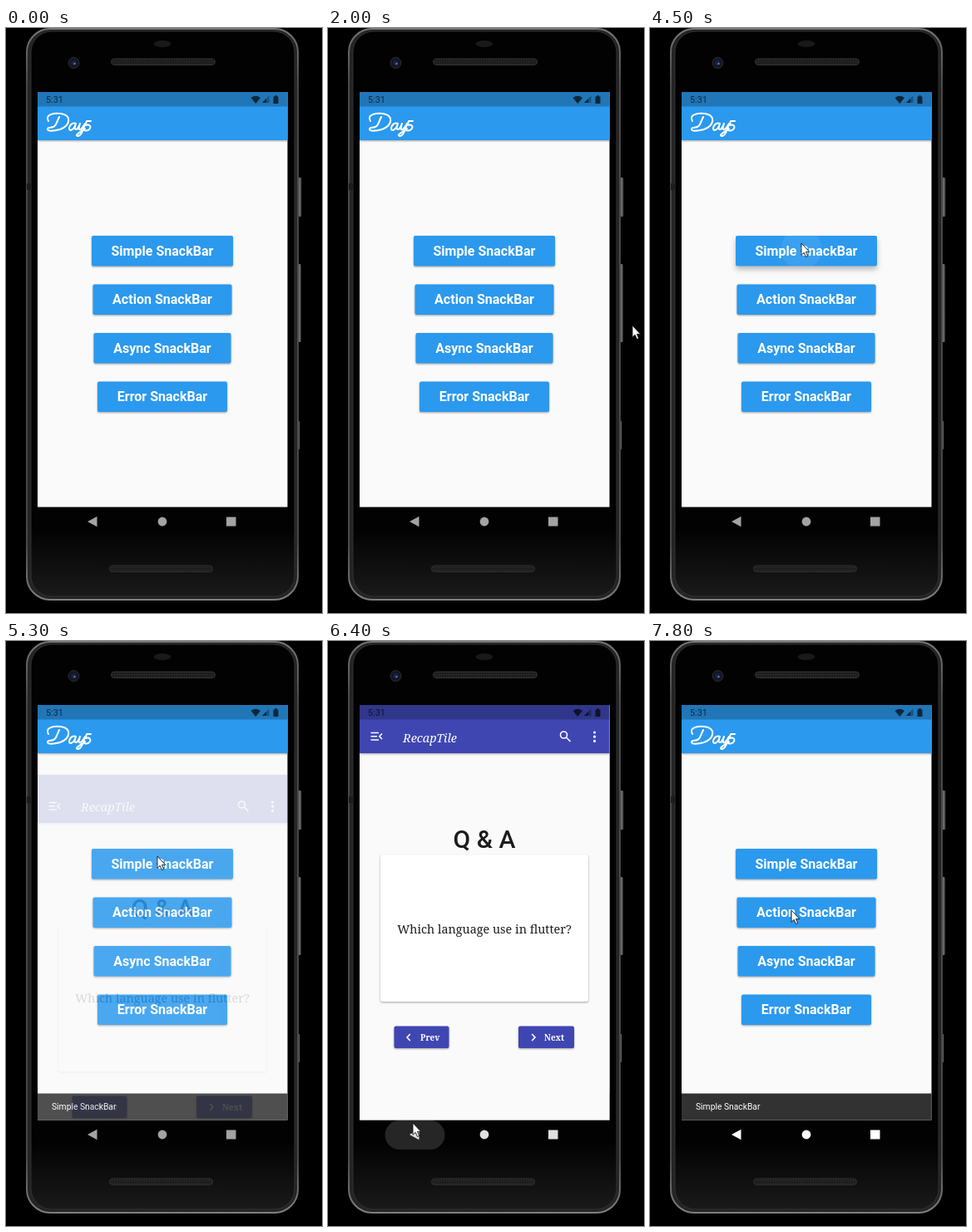
Write an HTML page that moves like this. It is 380 px wide and 704 px high and loops after 8 s.

```html
<!DOCTYPE html>
<html lang="en">
<head>
<meta charset="utf-8">
<title>SnackBar demo</title>
<style>
  html, body { margin: 0; width: 100%; height: 100%; overflow: hidden; background: #000; }
  svg { display: block; width: 380px; height: 704px; }
  text { font-family: Roboto, sans-serif; }
  .slab { font-family: "Noto Serif", serif; }
  .raised { filter: drop-shadow(0 1.5px 1.3px rgba(0,0,0,.36)); }
  .label { font-size: 16.05px; font-weight: 700; fill: #fff; text-anchor: middle; }
  .icon { fill: none; stroke: #fff; stroke-width: 1.6; }
</style>
</head>
<body>
<svg viewBox="0 0 380 704">
  <defs>
    <clipPath id="screen"><rect x="38" y="77" width="300.5" height="499.5"/></clipPath>
    <clipPath id="firstButton"><rect x="103" y="250" width="170" height="36.5" rx="2"/></clipPath>
    <linearGradient id="rim" x2="0" y2="1">
      <stop offset="0" stop-color="#777"/><stop offset=".1" stop-color="#484848"/>
      <stop offset=".9" stop-color="#484848"/><stop offset="1" stop-color="#808080"/>
    </linearGradient>
    <linearGradient id="face" x2="0" y2="1">
      <stop offset=".88" stop-color="#020202"/><stop offset="1" stop-color="#1a1a1a"/>
    </linearGradient>
    <linearGradient id="key">
      <stop offset="0" stop-color="#222"/><stop offset=".55" stop-color="#777"/><stop offset="1" stop-color="#2a2a2a"/>
    </linearGradient>
    <pattern id="mesh" width="3" height="3" patternUnits="userSpaceOnUse">
      <rect width="3" height="3" fill="#1c1c1c"/><circle cx="1.5" cy="1.5" r=".8" fill="#303030"/>
    </pattern>
  </defs>

  <!-- phone body -->
  <g fill="url(#key)">
    <rect x="350" y="180" width="5.5" height="47" rx="1.5"/>
    <rect x="350" y="284" width="5" height="94" rx="1.5"/>
    <rect x="350" y="473" width="3.5" height="34" rx="1"/>
  </g>
  <rect x="25" y="1" width="326" height="687" rx="28" fill="#242424" stroke="url(#rim)" stroke-width="2"/>
  <rect x="30" y="4" width="317" height="680" rx="25" fill="url(#face)" stroke="#303030"/>
  <rect x="25" y="187" width="6" height="8" fill="#1c1c1c"/>
  <ellipse cx="188" cy="19" rx="10.5" ry="4" fill="#191919"/>
  <circle cx="81.5" cy="42" r="6.5" fill="#15171c" stroke="#2c2d33"/>
  <circle cx="81.5" cy="42" r="3" fill="#1a2250"/>
  <circle cx="82.5" cy="43" r="1.1" fill="#7d8ce0"/>
  <g fill="url(#mesh)" stroke="#303030">
    <rect x="126.5" y="37" width="125" height="7.5" rx="3.7"/>
    <rect x="124.5" y="647" width="124" height="7.5" rx="3.7"/>
  </g>

  <g clip-path="url(#screen)">
    <!-- first page -->
    <rect x="38" y="77" width="301" height="500" fill="#fafafa"/>
    <rect class="raised" x="38" y="77" width="301" height="58" fill="#2b99ee"/>
    <g fill="none" stroke="#fff" stroke-width="2" stroke-linecap="round" stroke-linejoin="round" role="img" aria-label="Day5">
      <path d="M51 112C46 104 58 102 66 103C79 105 78 117 65 122C58 124 49 125 50 121C52 118 57 122 60 116L64 107"/>
      <path d="M84 115C78 112 73 123 78 123Q82 122 84 115Q81 123 85 122Q88 119 89 115Q86 124 90 122Q93 119 95 115Q91 131 86 130C82 129 90 125 95 121"/>
      <path d="M102 112H97L95.500 117C105 114 102 126 94 123"/>
    </g>
    <g id="buttons"></g>
    <g clip-path="url(#firstButton)"><circle id="ripple" cx="182" cy="266" fill="#fff"/></g>
    <g id="labels"></g>
    <g id="snack">
      <rect x="38" y="544.5" width="301" height="33" fill="#323232"/>
      <text id="snackText" x="55" y="564" font-size="10.3" fill="#fff">Simple SnackBar</text>
    </g>

    <!-- second page -->
    <g id="page">
      <rect x="38" y="77" width="301" height="500" fill="#fafafa"/>
      <rect class="raised" x="38" y="77" width="301" height="58" fill="#3f46b2"/>
      <path class="icon" d="M51.500 110.500h9.500m-9.500 4.300h7.500m-7.500 4.200h9.500m4-7.500l-3.200 3.300l3.200 3.200"/>
      <text class="slab" x="90" y="121.5" font-size="14.5" font-style="italic" fill="#fff">RecapTile</text>
      <circle class="icon" cx="283.5" cy="113" r="4"/>
      <path class="icon" d="M286.500 116l5 5"/>
      <path d="M320.500 110v11" stroke="#fff" stroke-width="3.2" stroke-linecap="round" stroke-dasharray="0 5.2"/>
      <g fill="#1c1c1c">
        <text x="188" y="248.5" font-size="30" font-weight="500" text-anchor="middle">Q &amp; A</text>
        <rect class="raised" x="63" y="257" width="250" height="177" rx="2.5" fill="#fff"/>
        <text class="slab" x="188" y="351.5" font-size="14.4" text-anchor="middle">Which language use in flutter?</text>
      </g>
      <g class="raised" fill="#3f46b2">
        <rect x="79.5" y="463.5" width="66" height="26.5" rx="2"/>
        <rect x="229" y="463.5" width="67" height="26.5" rx="2"/>
      </g>
      <path class="icon" d="M98.800 473l-3.800 4l3.800 4M245.200 473l3.800 4l-3.800 4"/>
      <g font-size="10" font-weight="600" fill="#fff">
        <text class="slab" x="111" y="481">Prev</text><text class="slab" x="260" y="481">Next</text>
      </g>
    </g>

    <!-- status bar -->
    <rect x="38" y="77" width="301" height="17.5" opacity=".23"/>
    <g opacity=".66">
      <text x="48" y="90" font-size="10.8">5:31</text>
      <path d="M294.500 84q5.800-4.500 11.500 0l-5.700 7z"/>
      <path d="M316.500 81.500v8.500h-8.500z" opacity=".45"/><path d="M313 85v5h-5z"/>
      <path d="M321.500 82.500h1.500v-1.200h3v1.200h1.500v8.500h-6z"/>
    </g>
  </g>

  <!-- navigation bar -->
  <rect id="pill" x="68.5" y="577" width="72" height="35" rx="17.5" fill="#262626"/>
  <g id="nav">
    <path d="M98 594l11.500-6.200v12.400z"/>
    <circle cx="188" cy="594" r="5.4"/>
    <rect x="265" y="588.5" width="11.5" height="11"/>
  </g>

  <path id="cursor" d="M0 0v14.300l3.200-3l2.300 5.200l2.200-1l-2.200-5.100h4.300z" fill="#fff" stroke="#111" stroke-width=".9"/>
</svg>
<script>
const LOOP = 8000, STEP = 100;
const $ = id => document.getElementById(id);
const ramp = (t, from, to) => Math.min(1, Math.max(0, (t - from) / (to - from)));
const smooth = k => k * k * (3 - 2 * k);

// Pointer strokes: begin, end, target and optional sideways bow.
const entry = { x: 39, y: 299 };
const strokes = [
  { from: 300, to: 800, x: 122, y: 55 },
  { from: 1200, to: 1400, x: 104, y: 34 },
  { from: 1600, to: 1700, x: 227, y: 37 },
  { from: 1800, to: 2000, x: 366, y: 358 },
  { from: 2000, to: 2300, x: 285, y: 563 },
  { from: 2300, to: 2700, x: 185, y: 376 },
  { from: 2700, to: 3100, x: 180, y: 261 },
  { from: 3900, to: 4000, x: 182, y: 259 },
  { from: 5500, to: 6100, x: 102, y: 580, bow: 195 },
  { from: 6800, to: 7400, x: 173, y: 336, bow: 55 },
  { from: 7600, to: 7800, x: 170, y: 324 }
];

function pointer(t) {
  let { x, y } = entry;
  for (const s of strokes) {
    const k = ramp(t, s.from, s.to);
    x += (s.x - x) * k + (s.bow || 0) * Math.sin(Math.PI * k);
    y += (s.y - y) * k;
    if (k < 1) break;
  }
  return [x, y];
}

function set(id, attrs) {
  for (const name in attrs) $(id).setAttribute(name, attrs[name]);
}

function buildButtons() {
  const widths = { Simple: 170, Action: 167, Async: 165, Error: 156 };
  Object.entries(widths).forEach(([name, width], i) => {
    const y = 250 + i * 58.5;
    $("buttons").innerHTML +=
      `<rect class="raised" x="${188 - width / 2}" y="${y}" width="${width}" height="36.5" rx="2" fill="#2b99ee"/>`;
    $("labels").innerHTML += `<text class="label" x="188" y="${y + 23.5}">${name} SnackBar</text>`;
  });
}

function draw(t) {
  set("cursor", { transform: `translate(${pointer(t)})`, opacity: t < 300 ? 0 : 1 });

  const lift = ramp(t, 4400, 4500) - ramp(t, 4600, 4800);
  $("buttons").firstChild.style.filter =
    `drop-shadow(0 ${1.5 + 2.5 * lift}px ${1.3 + 1.9 * lift}px rgba(0,0,0,${.36 - .1 * lift}))`;
  set("ripple", { r: 130 * ramp(t, 4430, 4800), opacity: .07 * lift });

  const rise = smooth(ramp(t, 4600, 4900));
  set("snack", { transform: `translate(0 ${33 * (1 - rise)})` });
  set("snackText", { opacity: rise * rise });

  const open = ramp(t, 5185, 5485) - ramp(t, 6400, 6700);
  set("page", { transform: `translate(0 ${125 * (1 - smooth(open))})`, opacity: open * open });

  set("pill", { opacity: ramp(t, 6100, 6300) - ramp(t, 6450, 6700) });
  const light = Math.round(163 + 92 * ramp(t, 6000, 6600));
  set("nav", { fill: `rgb(${light},${light},${light})` });
}

function tick() {
  draw(Math.floor((performance.now() - start) % LOOP / STEP) * STEP);
  requestAnimationFrame(tick);
}

buildButtons();
const start = performance.now();
tick();
</script>
</body>
</html>
```
